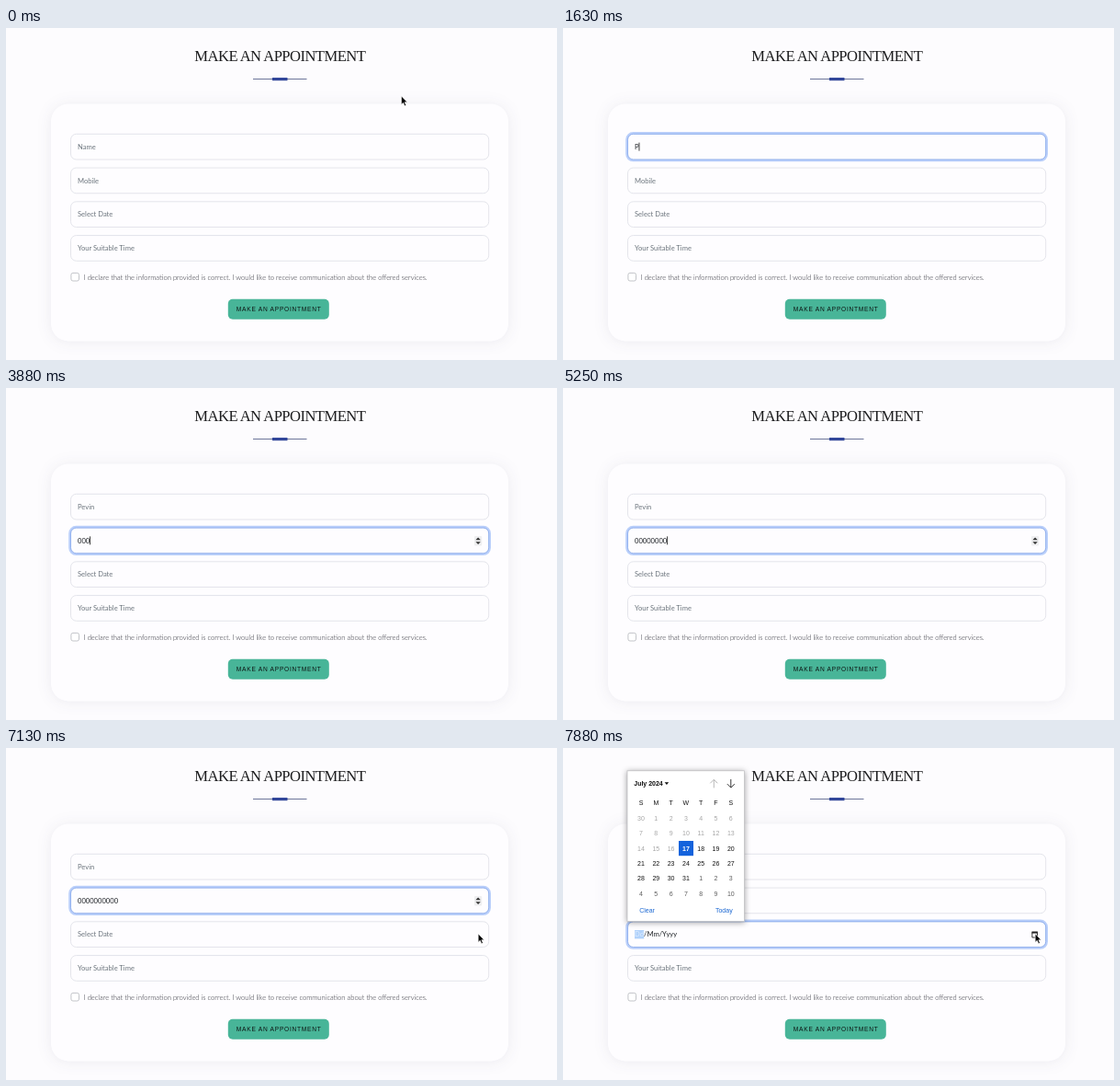
An HTML page for the animation above (8000 ms loop, 600x361 px).

```html
<!DOCTYPE html>
<html lang="en">
<head>
<meta charset="utf-8">
<title>Make an appointment</title>
<style>
  html, body { margin: 0; width: 100%; height: 100%; overflow: hidden; background: #fdfcfe; }
  svg { display: block; width: 100vw; height: 100vh; }
  text { font: 400 7.6px Lato, sans-serif; fill: #212529; white-space: pre; }
  .title { font: 400 16.6px "Liberation Serif", "Times New Roman", serif; letter-spacing: -.55px; fill: #1c1c1e; }
  .hint { fill: #6c757d; }
  .note { font-weight: 300; fill: #2b2b33; }
  .btn { font: 400 6.65px "Liberation Sans", Arial, sans-serif; letter-spacing: .72px; fill: #0d1513; }
  .card { fill: #fefdff; filter: drop-shadow(0 1px 8px rgba(40, 40, 80, .08)); }
  .box { fill: #fefdff; stroke: #dedfe6; stroke-width: .8; }
  .ring { fill: none; stroke: #bacffa; stroke-width: 2.4; }
  .edge { fill: none; stroke: #86a9ee; stroke-width: .8; }
  .popup { fill: #fff; stroke: #b9b9bd; stroke-width: .7; filter: drop-shadow(0 1px 3px rgba(0, 0, 0, .38)); }
  .cal text { font: 400 7px "Liberation Sans", Arial, sans-serif; text-anchor: middle; fill: #111; }
  .cal .bold { font-weight: 700; }
  .cal .past { fill: #a6a6a6; }
  .cal .next { fill: #5c5c5c; }
  .cal .link { fill: #1a67d2; }
  .cal .today { fill: #fff; font-weight: 700; }
</style>
</head>
<body>
<svg viewBox="0 0 600 361" preserveAspectRatio="none">
  <text class="title" x="298.3" y="36" text-anchor="middle">MAKE AN APPOINTMENT</text>
  <path d="M269 55.5H327.5" stroke="#4a5580" stroke-width=".8"/>
  <rect x="290" y="54" width="16.5" height="3.2" fill="#32479a"/>
  <rect class="card" x="49" y="82.5" width="498" height="258" rx="19"/>
  <g id="fields"></g>

  <rect x="70.9" y="266.4" width="8.6" height="8.6" rx="2" fill="#fff" stroke="#b4b6bc" stroke-width=".8"/>
  <text class="note" x="84.6" y="273.5">I declare that the information provided is correct. I would like to receive communication about the offered services.</text>
  <rect x="241.8" y="294.7" width="110" height="22" rx="5" fill="#48b598"/>
  <text class="btn" x="297.2" y="307.9" text-anchor="middle">MAKE AN APPOINTMENT</text>

  <g id="spin">
    <rect x="510" y="161" width="8.2" height="10.4" rx="1" fill="#eeeef0"/>
    <path d="M511.4 165.2L514.1 162.4L516.8 165.2ZM511.4 167.3L514.1 170.1L516.8 167.3Z" fill="#333"/>
  </g>

  <g id="date">
    <rect x="78" y="198" width="10.2" height="9.4" fill="#b1d2fb"/>
    <text x="78" y="205.4"><tspan fill="#deecff">Dd</tspan>/Mm/Yyyy</text>
    <path d="M510.9 200.6h5.6v5.4h-5.6z" fill="none" stroke="#222" stroke-width=".9"/>
    <path d="M510.5 199.6h6.4v1.9h-6.4z" fill="#222"/>
  </g>

  <rect id="caret" width=".8" height="9" fill="#111"/>

  <g id="cal" class="cal">
    <rect class="popup" x="70" y="24.8" width="127.6" height="163.8"/>
    <text class="bold" x="93" y="40.8">July 2024</text>
    <path d="M110.6 37.2h4.6l-2.3 2.7z" fill="#111"/>
    <path d="M164.3 43.4V34.4M160.3 38.3L164.3 34.3L168.3 38.3" fill="none" stroke="#b0b0b0" stroke-width=".9"/>
    <path d="M182.8 34V43M178.8 39.1L182.8 43.1L186.8 39.1" fill="none" stroke="#222" stroke-width=".9"/>
    <rect x="126" y="101" width="16" height="16.2" fill="#1463dc"/>
    <g id="days"></g>
    <text class="link" x="91.5" y="178.8">Clear</text>
    <text class="link" x="175.3" y="178.8">Today</text>
  </g>

  <path id="mouse" d="M0 0V9.2L2.1 7.3L3.6 10.8L5.2 10.1L3.7 6.7H6.5Z" fill="#000" stroke="#fff" stroke-width=".6"/>
</svg>

<script>
const LOOP = 8000;
const NAME = "Pevin", PHONE = "0000000000";
const nameKeys = [1500, 1750, 2000, 2250, 2500];
const phoneKeys = [3250, 3500, 3750, 4000, 4270, 4540, 4800, 5060, 5300, 5500];
const FOCUS = [1080, 2750, 7220];
const POPUP = 7720, FADE = 150;
// time, x, y of the pointer
const path = [
  [0, 430.5, 74], [250, 430.5, 74], [1000, 408, 126],
  [6400, 408, 126], [7080, 514.2, 202]
];

const $ = id => document.getElementById(id);
const clamp = v => Math.max(0, Math.min(1, v));
const smooth = v => v * v * (3 - 2 * v);

function add(parent, tag, attrs, label) {
  const el = document.createElementNS("http://www.w3.org/2000/svg", tag);
  for (const key in attrs) el.setAttribute(key, attrs[key]);
  if (label !== undefined) el.textContent = label;
  return parent.appendChild(el);
}

const hints = ["Name", "Mobile", "Select Date", "Your Suitable Time"];
const fields = hints.map((hint, i) => {
  const y = 115.3 + i * 36.75;
  const frame = { x: 70.5, y, width: 455.2, height: 27.7, rx: 6 };
  const g = $("fields");
  add(g, "rect", { class: "box", ...frame });
  const glow = add(g, "g", { opacity: 0 });
  add(glow, "rect", { class: "ring", x: 69.4, y: y - 1.1, width: 457.4, height: 29.9, rx: 7 });
  add(glow, "rect", { class: "edge", ...frame });
  const text = add(g, "text", { class: "hint", x: 78, y: y + 16.6 }, hint);
  return { y, hint, glow, text };
});

function buildDays() {
  const g = $("days"), px = c => 85 + c * 16.3;
  [..."SMTWTFS"].forEach((d, c) => add(g, "text", { x: px(c), y: 62.1 }, d));
  for (let i = 0; i < 42; i++) {
    // the grid begins on June 30
    const day = i === 0 ? 30 : i > 31 ? i - 31 : i;
    const kind = i < 17 ? "past" : i === 17 ? "today" : i > 31 ? "next" : "";
    add(g, "text", { class: kind, x: px(i % 7), y: 79 + Math.floor(i / 7) * 16.35 }, day);
  }
}
buildDays();

const show = (id, on) => $(id).setAttribute("visibility", on ? "visible" : "hidden");
const typed = (word, keys, t) => word.slice(0, keys.filter(k => k <= t).length);

function pointer(t) {
  for (let i = 1; i < path.length; i++) {
    const [t0, x0, y0] = path[i - 1], [t1, x1, y1] = path[i];
    if (t < t1) {
      const k = smooth(clamp((t - t0) / (t1 - t0)));
      return [x0 + (x1 - x0) * k, y0 + (y1 - y0) * k];
    }
  }
  return path[path.length - 1].slice(1);
}

function draw(t) {
  const active = FOCUS.filter(f => f <= t).length - 1;
  const values = [typed(NAME, nameKeys, t), typed(PHONE, phoneKeys, t), "", ""];

  fields.forEach((f, i) => {
    const rise = i < 3 ? clamp((t - FOCUS[i]) / FADE) : 0;
    const fall = i < 2 ? clamp((t - FOCUS[i + 1]) / FADE) : 0;
    f.glow.setAttribute("opacity", smooth(rise) - smooth(fall));
    const label = values[i] || f.hint;
    if (f.text.textContent !== label) f.text.textContent = label;
    f.text.style.fill = values[i] && i === active ? "#212529" : "#6c757d";
  });

  const dated = active === 2;
  fields[2].text.setAttribute("visibility", dated ? "hidden" : "visible");
  show("date", dated);
  show("cal", t >= POPUP);
  show("spin", active === 1);

  const editing = active === 0 || active === 1;
  let caret = false;
  if (editing) {
    const last = [...FOCUS, ...nameKeys, ...phoneKeys].filter(k => k <= t).reduce((a, b) => Math.max(a, b), 0);
    caret = (t - last) % 1000 < 500;
    const f = fields[active];
    const w = values[active] ? f.text.getComputedTextLength() : 0;
    $("caret").setAttribute("x", 78 + w);
    $("caret").setAttribute("y", f.y + 9.3);
  }
  show("caret", caret);

  const [x, y] = pointer(t);
  $("mouse").setAttribute("transform", `translate(${x} ${y})`);
  show("mouse", t < nameKeys[0] || t >= 6400);
}

const start = performance.now();
function tick() {
  draw((performance.now() - start) % LOOP);
  requestAnimationFrame(tick);
}
tick();
</script>
</body>
</html>
```
